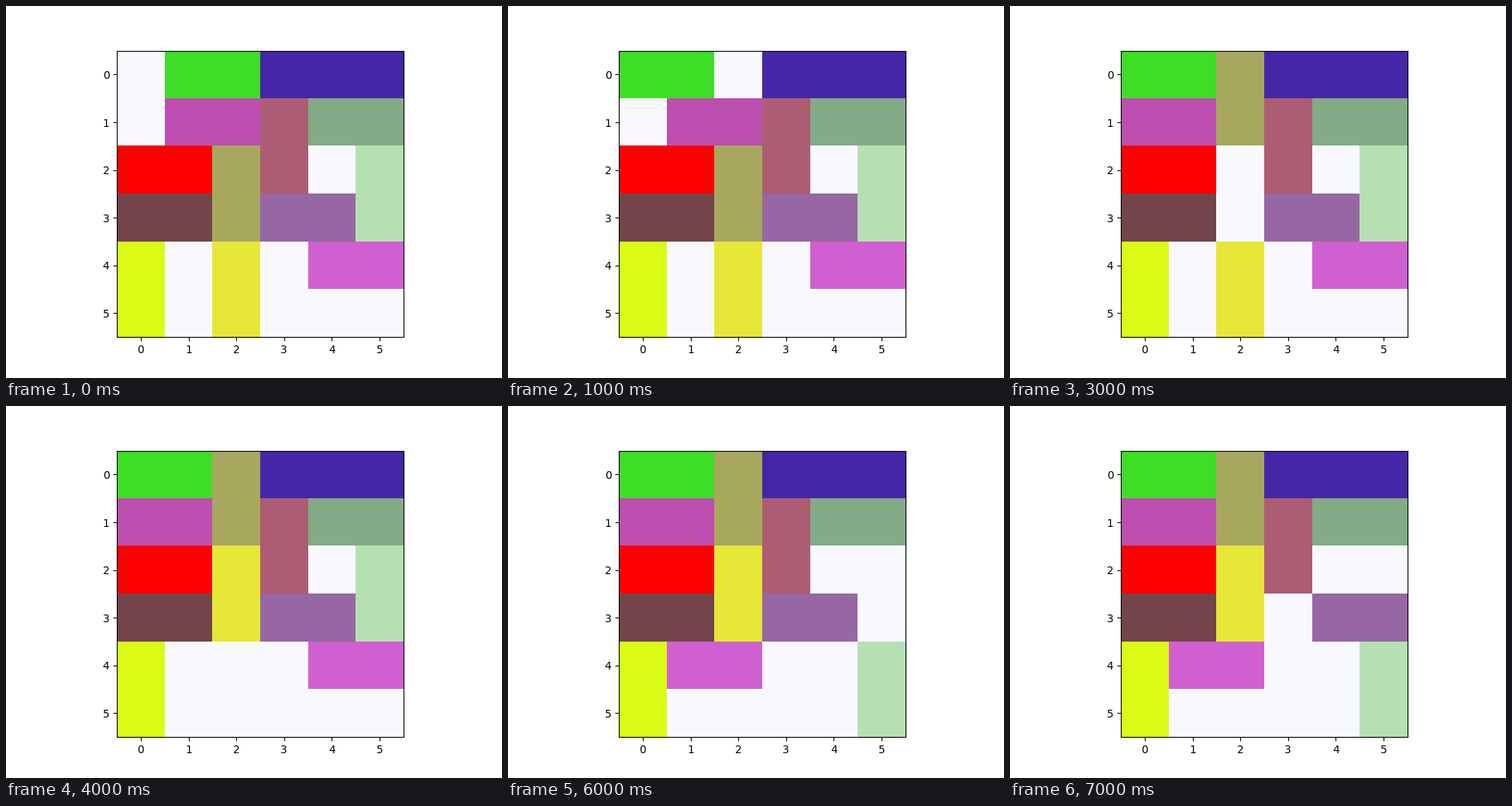
Animation, 640 px wide and 480 px high, one loop 8000 ms. Source, as a matplotlib script:

```python
import numpy as np
import matplotlib.pyplot as plt
from matplotlib.animation import FuncAnimation
from matplotlib.colors import to_rgb

# Each letter is a block, a dot is an empty cell.
LAYOUT = """
.GGIII
.MMRSS
AAOR.T
BBOPPT
L.Y.KK
L.Y...
""".split()

COLOURS = {
    ".": "#f8f9ff",
    "G": "#3edd28",
    "I": "#4526a6",
    "M": "#bc4faf",
    "R": "#ac5d73",
    "S": "#84ab87",
    "A": "#ff0000",
    "O": "#a7a85d",
    "T": "#b5e0b2",
    "B": "#73454b",
    "P": "#9767a3",
    "L": "#dafb14",
    "Y": "#e6e737",
    "K": "#d060d0",
}

# One slide per step: block and cells moved along its own length.
MOVES = "G-1 M-1 O-2 Y-2 K-3 T+2 P+1".split()


def slide(cells, move):
    """Return the board after one block has slid."""
    block, distance = move[0], int(move[1:])
    rows, cols = np.nonzero(cells == block)
    result = np.where(cells == block, ".", cells)
    if rows[0] == rows[-1]:
        cols = cols + distance
    else:
        rows = rows + distance
    result[rows, cols] = block
    return result


def board(step):
    """Colour grid after the first `step` moves."""
    cells = np.array([list(row) for row in LAYOUT])
    for move in MOVES[:step]:
        cells = slide(cells, move)
    return [[to_rgb(COLOURS[cell]) for cell in row] for row in cells]


fig, ax = plt.subplots(figsize=(6.4, 4.8), dpi=100)
image = ax.imshow(board(0), interpolation="nearest")
ax.set_xticks(range(len(LAYOUT)))
ax.set_yticks(range(len(LAYOUT)))


def update(step):
    image.set_data(board(step))
    return [image]


anim = FuncAnimation(fig, update, frames=len(MOVES) + 1, interval=1000,
                     repeat=True, repeat_delay=0)
plt.show()
```
